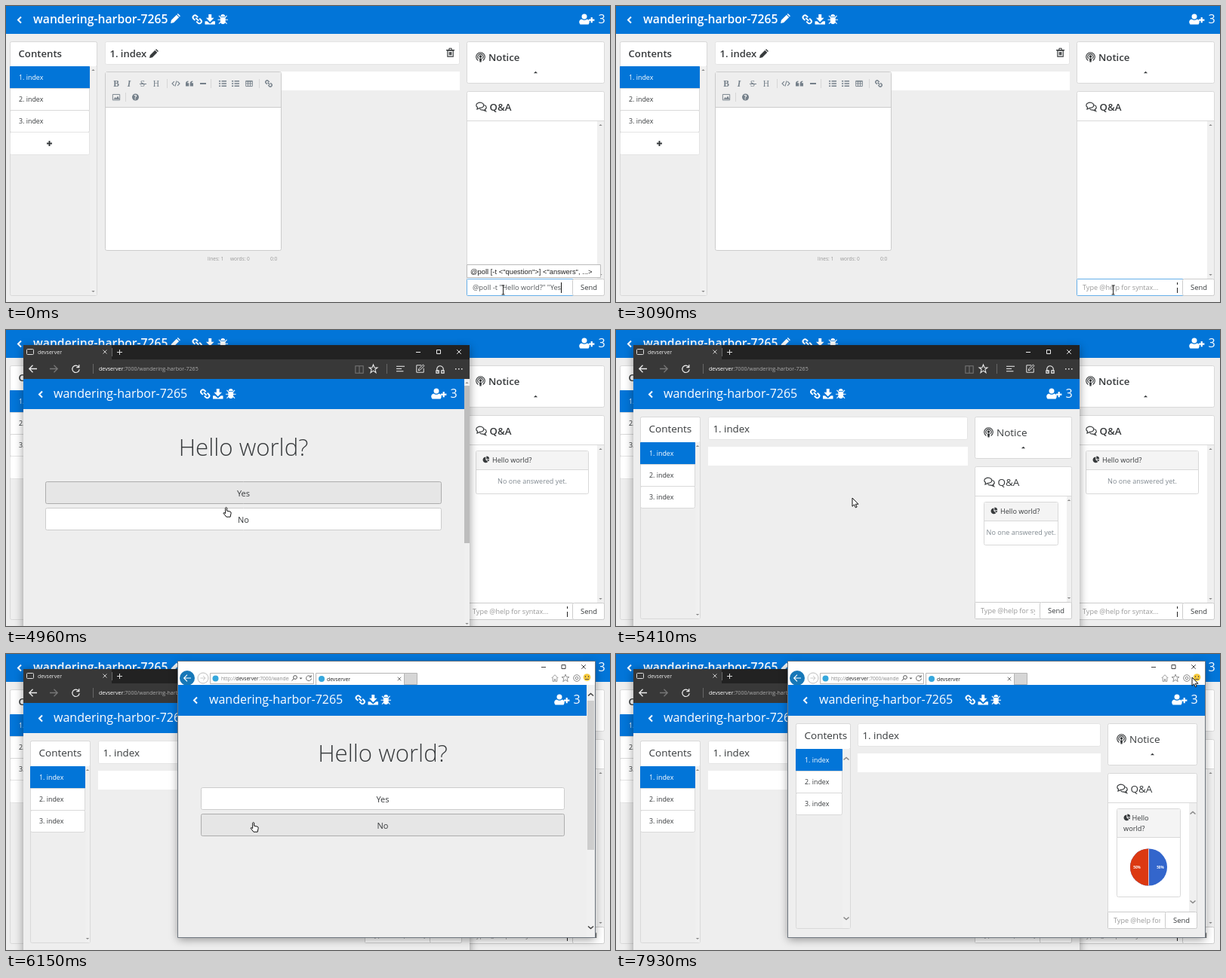
Animation, 800 px wide and 393 px high, one loop 8 s. Source, as an HTML page with a canvas:

```html
<!DOCTYPE html>
<html lang="en">
<head>
<meta charset="utf-8">
<title>Poll demo</title>
<style>
  html, body { margin: 0; width: 100%; height: 100%; overflow: hidden; background: #eee; }
  canvas { display: block; width: 800px; height: 393px; }
</style>
</head>
<body>
<canvas></canvas>
<script>
const canvas = document.querySelector('canvas');
const ctx = canvas.getContext('2d');
const dpr = window.devicePixelRatio || 1;
canvas.width = 800 * dpr;
canvas.height = 393 * dpr;

const LOOP = 8000;
const BLUE = '#0275d8', INK = '#373a3c', LINE = '#d9d9d9', PAGE = '#eee', TOOL = '#75808a';
const ROOM = 'wandering-harbor-7265', HOST = 'devserver', PORT = ':7000/';
const SANS = '"Open Sans", "Noto Sans", sans-serif';
const SERIF = '"Liberation Serif", serif';

// Icons on a grid of about 14 units: [filled path, stroked path, stroke width]
const ICONS = {
  pencil: ['M0 14l1-4.5 7.5-7.5 3.5 3.5-7.5 7.5zM9.3 1.2l1.2-1.2 3.5 3.5-1.2 1.2z'],
  link: ['', 'M8 4.2L6 2.2a2.7 2.7 0 0 0-4 4l2 2M6 9.8l2 2a2.7 2.7 0 0 0 4-4l-2-2M5 5l4 4', 2],
  download: ['M5 0h4v5h3.5l-5.5 5.5-5.5-5.5h3.5zM0 9.5h3l4 3.5 4-3.5h3v4.5h-14z'],
  bug: ['M4 3a3 3 0 0 1 6 0zM3.5 4h7v5a3.5 4.5 0 0 1-7 0z',
    'M0 7.5h14M1.5 2l3 3M12.5 2l-3 3M1.5 13l3-3M12.5 13l-3-3', 1.2],
  user: ['M7 0a3.4 3.4 0 0 1 0 7a3.4 3.4 0 0 1 0-7zM1.5 14c-3-4 0-7 2-7q3.5 2.5 7 0c2 0 5 3 2 7z' +
    'M13 7h2.6v-2.6h2.2v2.6h2.6v2.2h-2.6v2.6h-2.2v-2.6h-2.6z'],
  trash: ['', 'M2 3.5h8v8.5h-8zM0 2.8h12M4 2.3l.5-2h3l.5 2M4.5 5.5v4.5M6 5.5v4.5M7.5 5.5v4.5', 1.2],
  notice: ['M6.5 4.3a1.8 1.8 0 0 1 0 3.6a1.8 1.8 0 0 1 0-3.6zM4.8 8.4h3.4l-.7 5h-2z',
    'M3.4 11.5A5.8 5.8 0 1 1 9.6 11.5M4 8.8A3.5 3.5 0 1 1 9 8.8', 1.1],
  chat: ['', 'M2.5 7.5A5 3.6 0 1 1 5.5 8.4L2 10zM11.5 4.5a3.6 3.2 0 0 1 .6 6l1.4 2-3.5-1.4q-3 .4-4.5-1.4', 1.2],
  pie: ['M6 1.5v6l4.5 4A6 6 0 1 1 6 1.5zM7.5 0a6 6 0 0 1 6 6h-6zM8 7.3h5.5a6 6 0 0 1-2 3.5z'],
  home: ['', 'M1 7l6-6 6 6M3 6v7h3v-4h2v4h3v-7', 1.2],
  star: ['', 'M7 0l2 5h5l-4 3 1.5 5.5-4.5-3.3-4.5 3.3 1.5-5.5-4-3h5z', 1.3],
  refresh: ['', 'M12 4A6 6 0 1 0 13 8M12.5 0v4.5h-4.5', 1.5],
  gear: ['', 'M7 4.5a2.5 2.5 0 0 1 0 5a2.5 2.5 0 0 1 0-5zM7 1a6 6 0 0 1 0 12a6 6 0 0 1 0-12z', 1.4],
  code: ['', 'M4 3l-4 4 4 4M10 3l4 4-4 4M8.5 2l-3 10', 1.5],
  quote: ['M0 7q0-5 5-5v2q-2 0-2 2h3v6h-6zM8 7q0-5 5-5v2q-2 0-2 2h3v6h-6z'],
  list: ['', 'M5 2.5h9M5 7h9M5 11.5h9M0 2.5h3M0 7h3M0 11.5h3', 2],
  table: ['', 'M1 2h12v10h-12zM1 3h12M1 7h12M5 2v10M9 2v10', 1.3],
  image: ['M2 11l3-4 2 2 3-4 3 6z', 'M.5 2h13v10.5h-13z', 1.3],
  book: ['', 'M1 2h6v11h-6zM7 2h6v11h-6z', 1.2],
  hub: ['', 'M0 3h14M0 7h9M0 11h12', 1.3],
  note: ['', 'M9 1h-8v12h12v-7M4 10l1-3 7-7 2 2-7 7z', 1.2],
  share: ['', 'M4 11a5 5 0 1 1 7-1M1 9h4v4h-4zM9 9h4v4h-4z', 1.3],
  arrow: ['', 'M14 7h-13M7 1l-6 6 6 6', 1.6]
};
for (const parts of Object.values(ICONS)) {
  parts[0] = new Path2D(parts[0]);
  parts[1] = new Path2D(parts[1] || '');
}
const POINTER = new Path2D('M0 0v11.2l2.6-2.4 1.7 4 1.8-.8-1.7-3.8h3.6z');
const HAND = new Path2D('M2.5 1.2q1-1.4 2 0v4l4.5 1q1.2.5 1 2l-1 5h-5.2l-4-5q.4-1.5 2.7.4z');

const clamp = v => Math.max(0, Math.min(1, v));

function rect(x, y, w, h, fill, stroke, r = 0) {
  ctx.beginPath();
  if (stroke) ctx.roundRect(x + .5, y + .5, w - 1, h - 1, r);
  else ctx.roundRect(x, y, w, h, r);
  if (fill) { ctx.fillStyle = fill; ctx.fill(); }
  if (stroke) { ctx.strokeStyle = stroke; ctx.lineWidth = 1; ctx.stroke(); }
}

function text(s, x, y, size, color = INK, weight = 400, align = 'left', family = SANS) {
  ctx.font = `${weight} ${size}px ${family}`;
  ctx.textAlign = align;
  ctx.fillStyle = color;
  ctx.fillText(s, x, y);
}

function disc(x, y, r, fill, stroke) {
  ctx.beginPath();
  ctx.arc(x, y, r, 0, 7);
  if (fill) { ctx.fillStyle = fill; ctx.fill(); }
  if (stroke) { ctx.strokeStyle = stroke; ctx.lineWidth = 1; ctx.stroke(); }
}

function line(color, width, ...points) {
  ctx.beginPath();
  for (let i = 0; i < points.length; i += 2) ctx.lineTo(points[i], points[i + 1]);
  ctx.strokeStyle = color;
  ctx.lineWidth = width;
  ctx.stroke();
}

function icon(name, x, y, size = 14, color = INK, flip = false) {
  const [fill, stroke, width] = ICONS[name];
  ctx.save();
  ctx.translate(x + (flip ? size : 0), y);
  ctx.scale((flip ? -1 : 1) * size / 14, size / 14);
  ctx.fillStyle = ctx.strokeStyle = color;
  ctx.fill(fill);
  if (width) { ctx.lineWidth = width; ctx.stroke(stroke); }
  ctx.restore();
}

function clipped(x, y, w, h, draw) {
  ctx.save();
  ctx.beginPath();
  ctx.rect(x, y, w, h);
  ctx.clip();
  draw();
  ctx.restore();
}

const cross = (x, y, r, color) => {
  line(color, 1, x - r, y - r, x + r, y + r);
  line(color, 1, x - r, y + r, x + r, y - r);
};
const plus = (x, y, r, color, width = 1) => {
  line(color, width, x - r, y, x + r, y);
  line(color, width, x, y - r, x, y + r);
};
const caretUp = (x, y, r, color) => {
  ctx.beginPath();
  ctx.moveTo(x - r, y + r / 2); ctx.lineTo(x, y - r / 2); ctx.lineTo(x + r, y + r / 2);
  ctx.fillStyle = color;
  ctx.fill();
};

function scrollbar(x, y, w, bottom, large, color = '#8a8a8a') {
  rect(x, y, w, bottom - y, '#f0f0f0');
  const c = x + w / 2;
  if (large) {
    for (const [v, d] of [[y + 13, 3], [bottom - 13, -3]])
      line(color, 1.6, c - 3.5, v + d / 2, c, v - d / 2, c + 3.5, v + d / 2);
  } else {
    caretUp(c, y + 5, 2.2, color);
    caretUp(c, bottom - 5, -2.2, color);
  }
}

function header({ x, y, w, h, back, title, size, weight, tools, user }) {
  const cy = y + Math.floor(h / 2);
  rect(x, y, w, h, BLUE);
  line('#fff', 2, back + 2, cy - 3.5, back - 2, cy + .5, back + 2, cy + 4.5);
  text(ROOM, title, cy + 5, size, '#fff', weight);
  ['link', 'download', 'bug'].forEach((name, i) => icon(name, tools + i * 17, cy - 7, 13.5, '#fff'));
  icon('user', user, cy - 7.5, 14, '#fff');
  text('3', user + 25.5, cy + 5, 16, '#fff');
}

function pieChart(x, y, r, split) {
  disc(x, y, r, '#3366cc');
  const label = (s, lx) => text(s, lx, y + 2, r > 40 ? 6 : 4.6, '#fff', 700, 'center');
  if (split) {
    ctx.beginPath();
    ctx.arc(x, y, r, Math.PI / 2, Math.PI * 1.5);
    ctx.fillStyle = '#dc3912';
    ctx.fill();
    line('#fff', .7, x, y - r, x, y + r);
    label('50%', x - r * .63);
    label('50%', x + r * .63);
  } else {
    label('100%', x);
    const ly = y + r * 1.13, big = r > 40;
    disc(x - 6.5, ly, big ? 2.8 : 2.4, '#3366cc');
    text('Yes', x - 2, ly + 2.2, big ? 6.4 : 5.6, '#222');
  }
}

function pollCard(x, y, w, { radius, answered, split }) {
  const headHeight = split ? 38 : 25, top = y + headHeight;
  const bodyHeight = answered ? 80 + (radius - 24.5) * 2.5 : 33;
  rect(x, y, w, headHeight + Math.round(bodyHeight), '#fff', LINE, 2);
  rect(x + 1, y + 1, w - 2, headHeight - 1, '#f4f4f4');
  rect(x, top, w, 1, LINE);
  icon('pie', x + 9.5, y + 7.5, 9);
  if (split) {
    text('Hello', x + 20.5, y + 15.5, 9.2);
    text('world?', x + 9, y + 29.5, 9.2);
  } else text('Hello world?', x + 22, y + 15.5, 9.1);
  if (answered) pieChart(x + w / 2, top + 40 + (radius - 24.5) * 1.2, radius, split);
  else text('No one answered yet.', x + w / 2, top + 19, 9.05, '#818a91', 400, 'center');
}

function panels({ left: [lx, lw], mid: [mx, mw], right: [rx, rw], top, bottom, head, weight, size,
                  bar, large, focused, typed, card }) {
  const listTop = top + head, rowWidth = lw - bar;
  rect(lx, top, lw, bottom - top, PAGE, LINE, 2);
  rect(lx, top, lw, head + 1, '#fff', LINE, 2);
  text('Contents', lx + 11.5, top + 20.5, size, INK, weight);
  scrollbar(lx + rowWidth, listTop, bar - 1, bottom - 1, large);
  for (let i = 0; i < 3; i++) {
    const y = listTop + i * 29;
    rect(lx, y, rowWidth, 30, i ? '#fff' : BLUE, i ? LINE : BLUE, i === 2 ? 2 : 0);
    text(`${i + 1}. index`, lx + 12, y + 18, 8.9, i ? INK : '#fff');
  }

  rect(mx, top, mw, 31, '#fff', '#e4e4e4', 2);
  text('1. index', mx + 6.5, top + 20.5, size - .2, INK, weight);
  rect(mx, top + 40, mw, 25, '#fff');

  rect(rx, top, rw, 56, '#fff', LINE, 2);
  icon('notice', rx + 12, top + 14, 14);
  text('Notice', rx + 29, top + 26, size, INK, weight);
  caretUp(rx + rw / 2, top + 41, 2.6, INK);

  const qa = top + 66, inputTop = bottom - 23, send = rx + rw - 42;
  rect(rx, qa, rw, bottom - qa, '#fff', LINE, 2);
  icon('chat', rx + 12, qa + 14, 14);
  text('Q&A', rx + 30.5, qa + 25.5, size, INK, weight);
  rect(rx, qa + 39, rw, 1, LINE);
  scrollbar(rx + rw - bar, qa + 40, bar - 1, inputTop, large);
  if (card) pollCard(rx + 12, qa + 47, rw - bar - 23, card);

  rect(rx, inputTop, rw - 41, 23, '#fff', focused ? '#66afe9' : '#ccc', 1);
  rect(send - 1, inputTop, 43, 23, '#fff', '#ccc', 2);
  text('Send', send + 21, inputTop + 15, 9.4, INK, 400, 'center');
  clipped(rx + 8, inputTop, send - rx - 15, 23, () => {
    const y = inputTop + 15;
    if (!typed) return text('Type @help for syntax...', rx + 8, y, 9.05, '#999');
    ctx.font = `9.3px ${SANS}`;
    const width = ctx.measureText(typed).width;
    const x = Math.min(rx + 8, send - 8 - width);
    text(typed, x, y, 9.3, '#55595c');
    if (x === rx + 8) rect(x + width, inputTop + 5, 1, 14, '#111');
  });
}

function editor() {
  rect(131, 87, 234, 238, '#fff', '#ccc', 2);
  rect(132, 88, 232, 46, PAGE);
  rect(131, 134, 234, 1, '#ccc');
  [['B', 146, 'bold'], ['I', 163, 'italic bold'], ['S', 181, 400], ['H', 199, 400]].forEach(([s, x, style]) =>
    text(s, x, 107, 11.5, TOOL, style, 'center', SERIF));
  rect(177, 103, 9, 1, TOOL);
  for (const [name, x] of [['code', 220], ['quote', 238], ['list', 282], ['list', 299], ['table', 317], ['link', 343]])
    icon(name, x, 98, 10, TOOL);
  rect(257, 102, 8, 2, TOOL);
  for (const x of [213, 271, 335]) rect(x, 97, 1, 12, '#d6d6d6');
  icon('image', 141, 116, 10, TOOL);
  rect(158, 115, 1, 12, '#d6d6d6');
  disc(171.5, 121, 4.5, TOOL);
  text('?', 171.5, 124, 8, '#fff', 700, 'center');
  text('lines: 1', 267, 338, 6.5, '#999');
  text('words: 0', 297, 338, 6.5, '#999');
  text('0:0', 350, 338, 6.5, '#999');
}

const START = '@poll -t "Hello world?" "Yes', REST = '", "No"';
const KEY_TIMES = [330, 540, 620, 1000, 1460, 1640, 2080];
const SENT = 3090;

function mainPage(t) {
  rect(0, 0, 800, 393, PAGE);
  header({ x: 0, y: 0, w: 800, h: 37, back: 18, title: 36, size: 15.7, weight: 600, tools: 246.5, user: 759 });
  icon('pencil', 218, 10, 13, '#fff');
  const typed = t < SENT ? START + REST.slice(0, KEY_TIMES.filter(k => k <= t).length) : '';
  panels({
    left: [5, 116], mid: [131, 470], right: [610, 183], top: 47, bottom: 385, head: 33, weight: 600, size: 13.2, bar: 10,
    focused: t < 4430, typed, card: t >= 3300 && { radius: 50, answered: t >= 5780 }
  });
  rect(5, 167, 106, 31, '#fff', '#e4e4e4', 2);
  plus(57.5, 182.5, 3.5, INK, 2);
  icon('pencil', 190, 57, 12);
  icon('trash', 583, 56, 13);
  editor();
  if (t < SENT) {
    rect(610, 343, 178, 18, '#fff', '#bbb');
    text('@poll [-t <"question">] <"answers", ...>', 615, 355.5, 9.4, '#222', 400, 'left', '"Liberation Sans", sans-serif');
  }
  if (t >= 1460) {
    rect(743, 367, 1, 14, '#222');
    if (t >= 2630) rect(743, 370, 1, 4, '#fff');
  }
}

// Rows of the poll page sit 35 px apart; the pointer lights up the one it is on.
function hoveredRow(x, w, top, [cx, cy]) {
  if (cx < x || cx > x + w || cy < top || cy > top + 65) return -1;
  return cy < top + 35 ? 0 : 1;
}

function pollPage(x, w, top, pos) {
  const c = x + w / 2, hover = hoveredRow(x, w, top, pos);
  text('Hello world?', c, top - 34, 31.2, INK, 300, 'center');
  ['Yes', 'No'].forEach((answer, i) => {
    const y = top + i * 35;
    rect(x, y, w, 30, hover === i ? '#e6e6e6' : '#fff', hover === i ? '#adadad' : '#ccc', 2);
    text(answer, c, y + 19.5, 11, INK, 400, 'center');
  });
}

function windowButtons(x, y, step, color) {
  rect(x - 3, y, 6, 1, color);
  rect(x + step - 3, y - 3, 6, 6, null, color);
  cross(x + step * 2, y, 2.8, color);
}

function shadowBox(x, y, w, h, fill) {
  ctx.save();
  ctx.shadowColor = 'rgba(0,0,0,.4)';
  ctx.shadowBlur = 11 * dpr;
  ctx.shadowOffsetY = 3 * dpr;
  rect(x, y, w, h, fill);
  ctx.restore();
}

function darkBrowser(t, pos) {
  const polling = t < 5410;
  shadowBox(23, 20, 591, 400, PAGE);
  rect(23, 20, 591, 19, '#222');
  rect(23, 20, 117, 19, '#383838');
  rect(23, 39, 591, 26, '#383838');
  rect(27, 25, 10, 8, null, '#ddd', 1);
  text(HOST, 42, 32, 7, '#eee');
  cross(131, 29, 2.5, '#ccc');
  rect(140, 24, 1, 11, '#666');
  plus(150.5, 29.5, 3.5, '#ddd');
  windowButtons(546, 29, 27, '#eee');
  icon('arrow', 30, 46, 11, '#eee');
  icon('arrow', 58, 46, 11, '#777', true);
  icon('refresh', 87, 46, 11, '#eee');
  rect(115, 45, 1, 13, '#666');
  text(HOST, 123, 54, 7.1, '#fff');
  const hostWidth = ctx.measureText(HOST).width;
  text(PORT + ROOM, 123 + hostWidth, 54, 7.1, '#aaa');
  icon('book', 462, 46, 12, '#777');
  icon('star', 481, 46, 11, '#eee');
  rect(504, 45, 1, 13, '#666');
  icon('hub', 517, 46, 11, '#eee');
  icon('note', 543, 46, 11, '#eee');
  icon('share', 569, 46, 12, '#eee');
  for (const x of [595, 599, 603]) rect(x, 51, 1.5, 1.5, '#eee');
  header({ x: 23, y: 65, w: 591, h: 40, back: 46, title: 63, size: 16, weight: 400, tools: 257, user: polling ? 563 : 570 });
  if (polling) {
    pollPage(52, 525, 201, pos);
    scrollbar(607, 65, 7, 395);
    rect(607, 74, 7, 209, '#bdbdbd');
  } else panels({
    left: [32, 80], mid: [122, 344], right: [475, 129], top: 115, bottom: 384, head: 34, weight: 400, size: 13.5, bar: 7,
    card: { radius: 29, answered: t >= 5470 }
  });
}

function lightBrowser(t, pos) {
  const polling = t < 6760;
  shadowBox(228, 10, 552, 366, '#fff');
  rect(227, 9, 554, 368, null, '#6f7780');
  windowButtons(712, 17, 26.5, '#444');
  disc(240, 32, 10, '#1778b8');
  icon('arrow', 235, 27, 10, '#fff');
  disc(261, 32, 7, null, '#bbb');
  icon('arrow', 257.5, 28.5, 7, '#bbb', true);
  rect(270, 25, 138, 15, '#fff', '#b5b5b5');
  disc(277.5, 32.5, 4, '#35a7dc');
  clipped(284, 25, 91, 15, () => {
    text('http://', 285, 35, 6.6, '#888');
    const width = ctx.measureText('http://').width;
    text(HOST, 285 + width, 35, 6.6, '#222');
    text(PORT + ROOM, 285 + width + ctx.measureText(HOST).width, 35, 6.6, '#888');
  });
  disc(383, 31, 2.4, null, '#555');
  line('#555', 1, 381.3, 32.7, 378.5, 35.5);
  caretUp(390.5, 32.5, -2, '#555');
  icon('refresh', 397, 28, 8, '#555');
  rect(410, 25, 118, 17, '#fff', '#b5b5b5');
  disc(418, 33, 4, '#35a7dc');
  text(HOST, 425, 35.5, 6.8, '#222');
  cross(521, 33, 2.3, '#777');
  rect(527, 25, 18, 16, '#d6d6d6', '#b5b5b5');
  icon('home', 722, 27, 10, '#888');
  icon('star', 736, 27, 10, '#888');
  icon('gear', 751, 27, 10, '#888');
  disc(769.5, 31, 4.8, '#f5c93b');
  rect(767, 29, 1, 2, '#654');
  rect(771, 29, 1, 2, '#654');
  rect(767, 33, 5, 1, '#654');
  rect(228, 41, 552, 335, PAGE);
  header({ x: 228, y: 41, w: 552, h: 41, back: 251, title: 269, size: 16, weight: 400, tools: 462.5, user: polling ? 726 : 736 });
  if (polling) {
    pollPage(258, 482, 177, pos);
    scrollbar(769, 41, 11, 376, true, '#444');
    rect(770, 62, 9, 198, '#cdcdcd');
  } else panels({
    left: [238, 73], mid: [320, 322], right: [651, 119], top: 92, bottom: 365, head: 34, weight: 400, size: 13.5, bar: 11, large: true,
    card: { radius: 24.5, answered: t >= 6820, split: true }
  });
}

function openWindow(t, start, centre, draw) {
  const p = clamp((t - start) / 210);
  if (!p) return;
  const ease = 1 - (1 - p) ** 3, scale = .8 + .2 * ease;
  ctx.save();
  ctx.globalAlpha = ease;
  ctx.translate(centre, 393);
  ctx.scale(scale, scale);
  ctx.translate(-centre, -393);
  draw();
  ctx.restore();
}

// [time, x, y] of the pointer tip
const ROUTE = [
  [3680, 658, 377], [3920, 607, 377], [4000, 607, 377], [4290, 431, 394], [4700, 380, 400], [4800, 350, 330],
  [4960, 291, 235], [5190, 313, 223], [5700, 313, 223], [5860, 469, 233], [5930, 412, 255], [6000, 350, 323],
  [6080, 249, 256], [6150, 327, 223], [6540, 392, 226], [6940, 392, 226], [7200, 520, 290], [7400, 660, 345],
  [7600, 740, 200], [7780, 763, 38], [7930, 763, 31]
];

function pointerAt(t) {
  const i = ROUTE.findIndex(k => k[0] > t);
  if (i === 0) return ROUTE[0].slice(1);
  if (i < 0) return ROUTE[ROUTE.length - 1].slice(1);
  const [t0, x0, y0] = ROUTE[i - 1], [t1, x1, y1] = ROUTE[i];
  const p = (t - t0) / (t1 - t0);
  return [x0 + (x1 - x0) * p, y0 + (y1 - y0) * p];
}

function drawPointer(t, [x, y]) {
  if (t < 3920 && x > 610) {
    line('#222', 1, x + .5, y - 6, x + .5, y + 6);
    for (const d of [-6, 6]) line('#222', 1, x - 1.5, y + d, x + 2.5, y + d);
    return;
  }
  const hand = t > 4700 && t < 5410 && hoveredRow(52, 525, 201, [x, y]) >= 0 ||
    t > 6080 && t < 6760 && hoveredRow(258, 482, 177, [x, y]) >= 0;
  ctx.save();
  ctx.translate(hand ? x - 3 : x, y);
  ctx.fillStyle = '#fff';
  ctx.strokeStyle = '#111';
  ctx.lineWidth = 1;
  ctx.fill(hand ? HAND : POINTER);
  ctx.stroke(hand ? HAND : POINTER);
  ctx.restore();
}

function frame(now) {
  const t = now % LOOP, pos = pointerAt(t);
  ctx.setTransform(dpr, 0, 0, dpr, 0, 0);
  mainPage(t);
  openWindow(t, 4500, 318, () => darkBrowser(t, pos));
  openWindow(t, 5870, 504, () => lightBrowser(t, pos));
  drawPointer(t, pos);
  requestAnimationFrame(frame);
}
requestAnimationFrame(frame);
</script>
</body>
</html>
```
